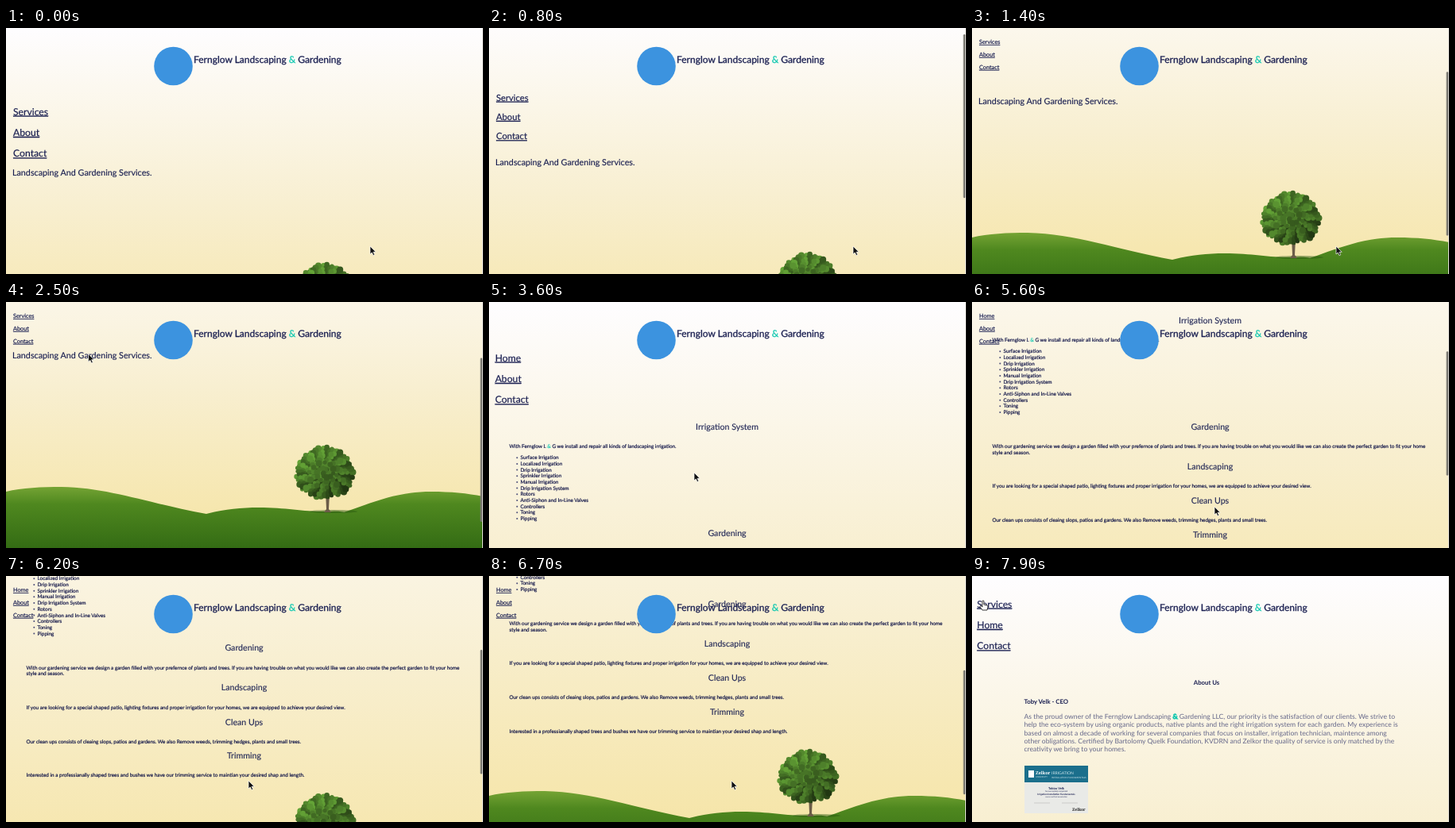
An HTML page for the animation above (8 s loop, 600 px wide and 310 px high).

```html
<!DOCTYPE html>
<html lang="en">
<head>
<meta charset="utf-8">
<title>Landscaping and gardening site</title>
<style>
  html, body { margin: 0; width: 100%; height: 100%; overflow: hidden; background: #fdfcfe; }
  svg { display: block; width: 600px; height: 310px; }
  text { font-family: Lato, "Open Sans", sans-serif; fill: #1b2052; text-rendering: geometricPrecision; white-space: pre; }
  .title { font-size: 12px; stroke: #1b2052; stroke-width: .3px; }
  .head { font-size: 10.65px; fill: #252a58; stroke: #252a58; stroke-width: .15px; }
  .lead { font-size: 10.75px; stroke: #1b2052; stroke-width: .15px; }
  .body { font-size: 6.38px; fill: #14184a; stroke: #14184a; stroke-width: .2px; }
  .bold { font-size: 7.8px; font-weight: 700; }
  .about { font-size: 8.6px; fill: #66688a; }
  .nav text { text-decoration: underline; stroke: #1b2052; stroke-width: .2px; }
  .mid { text-anchor: middle; }
  .amp { fill: #12c8b0; stroke: #12c8b0; }
  .mark { font: 700 5.5px "Noto Serif", serif; }
</style>
</head>
<body>
<svg id="stage" viewBox="0 0 600 310">
  <defs>
    <linearGradient id="sky" x2="0" y2="1">
      <stop stop-color="#fefdff"/><stop offset=".5" stop-color="#f8efd1"/><stop offset="1" stop-color="#f5e3a0"/>
    </linearGradient>
    <linearGradient id="grass" gradientUnits="userSpaceOnUse" x1="0" y1="256" x2="0" y2="350">
      <stop stop-color="#78a636"/><stop offset=".25" stop-color="#4f881f"/><stop offset="1" stop-color="#2c6411"/>
    </linearGradient>
    <g id="scene" fill="url(#grass)">
      <path d="M0 264C20 259 45 258 70 258C130 259 180 279 252 292C300 302 330 320 350 450H0Z"/>
      <path d="M200 312C225 300 240 295 252 292C275 286 295 284 318 284C355 284 375 290 410 289C440 287 470 300 500 450H200Z"/>
      <path d="M385 301C440 290 475 264 535 264C560 264 580 266 600 270V450H385Z"/>
      <path d="M310 318C370 300 430 297 480 299C530 302 560 300 600 303V450H310Z"/>
      <ellipse cx="412" cy="289" rx="30" ry="2" fill="#2a5a10" opacity=".5"/>
      <path fill="#6b5c48" d="M402 264L388 252L391 251L404 261L414 252L417 253L407 266L406 286L409 290H400L403 286Z"/>
      <g id="crown"></g>
    </g>
  </defs>
  <g id="pages"></g>
  <circle cx="210.5" cy="48" r="24.3" fill="#3c93df"/>
  <g id="banner"></g>
  <g id="nav" class="nav"></g>
  <path d="M599.5 0V310" stroke="#d9d6d2"/>
  <rect id="thumb" x="596.6" width="2.6" rx="1.3" fill="#7b7972"/>
  <g id="cursor">
    <path id="arrow" d="M0 0V10L2.3 8L3.9 11.6L5.7 10.8L4.1 7.3H7.2Z" fill="#111" stroke="#fff" stroke-width=".7"/>
    <path id="hand" d="M-1 0C-1-1.5 1-1.5 1 0V4L5 5C6 5.4 6 6 5.8 7.5L5 11H-1L-4 6.8C-4.4 5.5-3 5-2.2 6L-1 7Z" fill="#fff" stroke="#222" stroke-width=".9"/>
  </g>
</svg>
<script>
const $ = id => document.getElementById(id);
const AMP = '<tspan class="amp">&amp;</tspan>';
const text = (x, y, cls, str) => `<text x="${x}" y="${y}" class="${cls}">${str}</text>`;
const lines = (x, y, step, cls, list) => list.map((s, i) => text(x, y + i * step, cls, s)).join('');
const head = (y, str) => text(299.5, y, 'head mid', str);
const scene = y => `<use href="#scene" y="${y}"/>`;

const kinds = ['Surface Irrigation', 'Localized Irrigation', 'Drip Irrigation', 'Sprinkler Irrigation',
  'Manual Irrigation', 'Drip Irrigation System', 'Rotors', 'Anti-Siphon and In-Line Valves',
  'Controllers', 'Toning', 'Pipping'];

const certificate = `
  <rect x="66" y="239" width="80" height="60" fill="#e9eae7"/>
  <rect x="66" y="239" width="80" height="21" fill="#1b6f8c"/>
  <rect x="71" y="245" width="7" height="9" fill="#fff"/>
  <text x="80" y="250" class="mark" style="fill:#fff">Zelkor</text>
  <text x="100" y="249.5" style="font-size:5px;fill:#cfe6ec">IRRIGATION</text>
  <text x="100" y="254.5" style="font-size:2.9px;fill:#cfe6ec">INSTALLATION FUNDAMENTALS</text>
  <text x="80" y="254" style="font-size:2.6px;fill:#cfe6ec">UNIVERSITY</text>
  <g class="mid">
    <text x="106" y="268.5" style="font-size:4px;font-weight:700">Tobias Velk</text>
    <text x="106" y="272.2" style="font-size:2.4px">has successfully completed</text>
    <text x="106" y="276" style="font-size:3px;font-weight:700">Irrigation Installation Fundamentals</text>
    <text x="106" y="279" style="font-size:2.2px">course and final examination</text>
  </g>
  <path d="M78 286H98M113 286H133" stroke="#aaa" stroke-width=".5"/>
  <text x="126" y="295.5" class="mark" style="font-size:5px;fill:#222">Zelkor</text>`;

// load: when the page opens; sky: gradient height; height: scrollable height; scroll: [time, offset]
const pages = [
  { load: -1000, sky: 441, height: 550, links: ['Services', 'About', 'Contact'],
    scroll: [[700, 0], [1400, 90], [2000, 115]],
    art: scene(90) + text(8, 185.7, 'lead', 'Landscaping And Gardening Services.') },
  { load: 3300, sky: 620, height: 726, links: ['Home', 'About', 'Contact'],
    scroll: [[4300, 0], [4800, 69], [5600, 134], [6700, 256], [7000, 275]],
    art: scene(269) + head(161, 'Irrigation System') +
      text(25.5, 184.3, 'body', `With Fernglow L ${AMP} G we install and repair all kinds of landscaping irrigation.`) +
      lines(39.5, 198.3, 7.68, 'body', kinds) +
      kinds.map((_, i) => `<circle cx="35.3" cy="${196.2 + i * 7.68}" r="1" fill="#4a4d78"/>`).join('') +
      head(294.7, 'Gardening') +
      lines(25.5, 318.3, 7.7, 'body', [
        'With our gardening service we design a garden filled with your prefernce of plants and trees. If you are having trouble on what you would like we can also create the perfect garden to fit your home',
        'style and season.']) +
      head(345, 'Landscaping') +
      text(25.5, 368.4, 'body', 'If you are looking for a special shaped patio, lighting fixtures and proper irrigation for your homes, we are equipped to achieve your desired view.') +
      head(388.3, 'Clean Ups') +
      text(25.5, 411.3, 'body', 'Our clean ups consists of cleaing slops, patios and gardens. We also Remove weeds, trimming hedges, plants and small trees.') +
      head(430.8, 'Trimming') +
      text(25.5, 453.6, 'body', 'Interested in a professianally shaped trees and bushes we have our trimming service to maintian your desired shap and length.') },
  { load: 7800, sky: 620, height: 726, links: ['Services', 'Home', 'Contact'],
    scroll: [[9000, 0]],
    art: text(295, 136.8, 'bold mid', 'About Us') + text(65.5, 160.8, 'bold', 'Toby Velk - CEO') +
      lines(65.5, 180, 10.3, 'about', [
        `As the proud owner of the Fernglow Landscaping ${AMP} Gardening LLC, our priority is the satisfaction of our clients. We strive to`,
        'help the eco-system by using organic products, native plants and the right irrigation system for each garden. My experience is',
        'based on almost a decade of working for several companies that focus on installer, irrigation technician, maintence among',
        'other obligations. Certified by Bartolomy Quelk Foundation, KVDRN and Zelkor the quality of service is only matched by the',
        'creativity we bring to your homes.']) + certificate }
];

// Leafy crown: scattered blobs, wider below, lighter towards the upper left
const LEAVES = 240;
let leaves = '<ellipse cx="401" cy="239" rx="35" ry="30" fill="#2f6318"/>';
for (let n = 0; n < LEAVES; n++) {
  const i = n * 97 % LEAVES;
  const r = Math.sqrt(i / LEAVES), a = i * 2.4;
  const dx = r * Math.cos(a), dy = r * Math.sin(a);
  const light = 29 - dy * 6 - dx * 4 + (n * 7 % 5 - 2) * 4;
  const x = 401 + dx * 36 * (1 + .13 * dy), y = 239.5 + dy * 32;
  leaves += `<circle cx="${x}" cy="${y}" r="${2.6 + n % 3 * .7}" fill="hsl(95 50% ${light}%)"/>`;
}
$('crown').innerHTML = leaves;
$('banner').innerHTML = text(236, 43.8, 'title', `Fernglow Landscaping ${AMP} Gardening`);
$('pages').innerHTML = pages.map(p =>
  `<g><rect width="600" height="${p.sky}" fill="url(#sky)"/>${p.art}</g>`).join('');
const groups = [...$('pages').children];

const mouse = [[2100, 458, 275], [2600, 15, 13], [3100, 15, 13], [3600, 258, 215],
  [3700, 258, 215], [4100, 305, 258], [7000, 305, 258], [7500, 14, 32]];

const VIEW = 337;       // browser window, a little taller than the stage
const NAV_TIME = 500;   // menu transition
const mix = (a, b, k) => a + (b - a) * k;
const clamp = k => Math.max(0, Math.min(1, k));

// Value of a keyed path, held before the first and after the last key
function at(keys, t, col) {
  const i = keys.findIndex(k => k[0] > t);
  if (i < 1) return keys.at(i)[col];
  const a = keys[i - 1], b = keys[i];
  return mix(a[col], b[col], (t - a[0]) / (b[0] - a[0]));
}

function draw(t) {
  const now = pages.findLastIndex(p => t >= p.load);
  const page = pages[now];
  const scroll = at(page.scroll, t, 1);
  groups.forEach((g, i) => {
    g.style.display = i === now ? '' : 'none';
    g.setAttribute('transform', `translate(0 ${-scroll})`);
  });

  // The menu drops in after loading and shrinks into the corner once scrolling starts
  const drop = clamp((t - page.load) / NAV_TIME);
  const shrink = clamp((t - page.scroll[0][0]) / NAV_TIME);
  const x = mix(5.6, 9, drop);
  const y = mix(mix(22, 109.5, drop), 20, shrink);
  $('nav').style.fontSize = mix(12.2, 7.3, shrink) + 'px';
  $('nav').innerHTML = lines(x, y, mix(26.4, 15.9, shrink), '', page.links);

  const thumb = $('thumb'), ratio = VIEW / page.height;
  thumb.style.display = scroll > 0 ? '' : 'none';
  thumb.setAttribute('y', scroll * ratio);
  thumb.setAttribute('height', VIEW * ratio);

  const mx = at(mouse, t, 1), my = at(mouse, t, 2);
  const hand = mx < 36;
  $('cursor').setAttribute('transform', `translate(${mx} ${my})`);
  $('hand').style.display = hand ? '' : 'none';
  $('arrow').style.display = hand ? 'none' : '';
}

let start, last = -1;
function tick(time) {
  start ??= time;
  const t = Math.floor((time - start) % 8000 / 100) * 100;
  if (t !== last) draw(last = t);
  requestAnimationFrame(tick);
}
draw(0);
requestAnimationFrame(tick);
</script>
</body>
</html>
```
